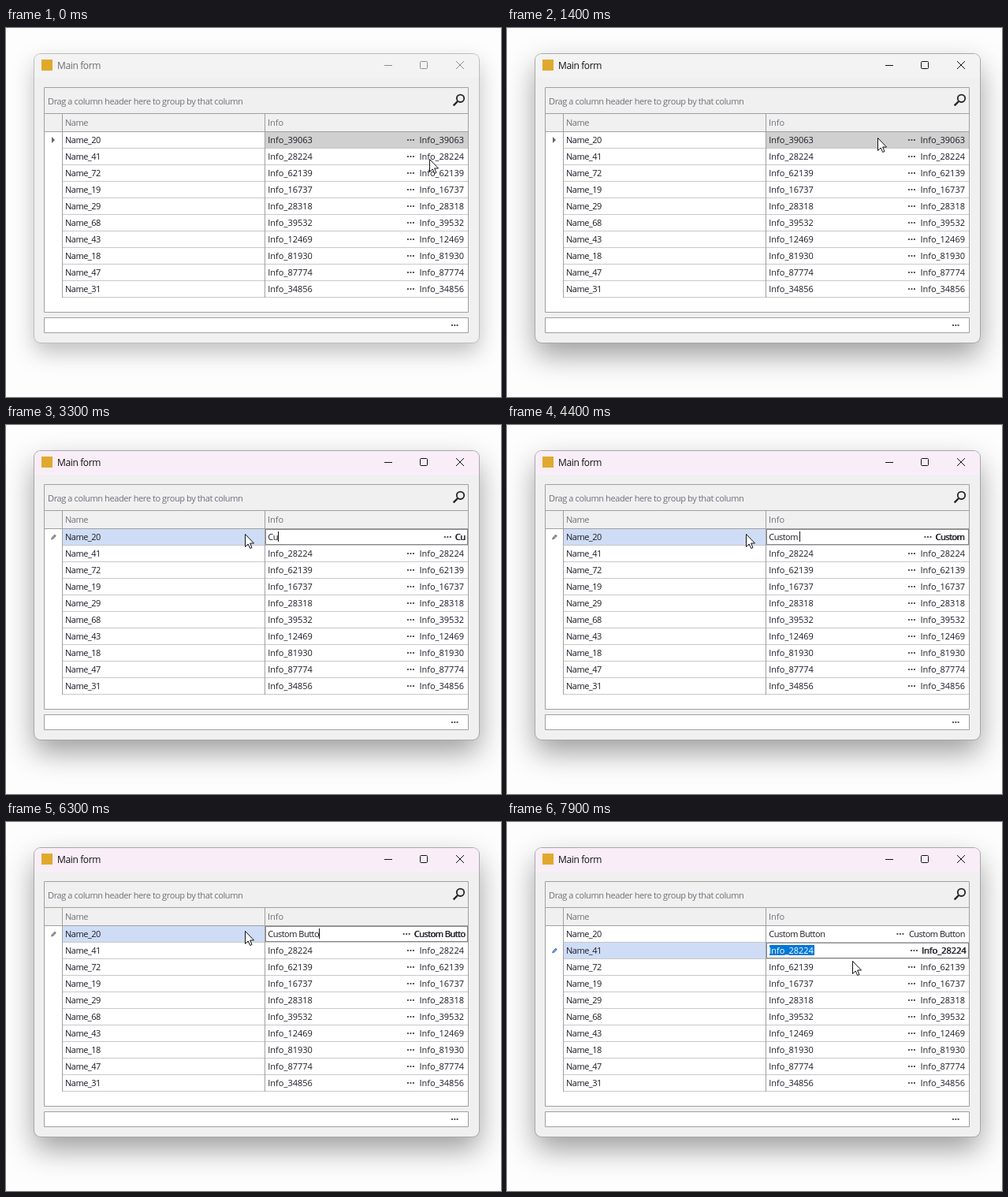
Recreate the animation shown at these times as an HTML page. Size 628 by 468 pixels, loop 8 s.

```html
<!DOCTYPE html>
<html lang="en">
<head>
<meta charset="utf-8">
<title>Main form</title>
<style>
html, body { margin: 0; width: 100%; height: 100%; overflow: hidden; background: #fdfdfd; }
#stage { position: relative; width: 628px; height: 468px; overflow: hidden; }
#window {
  position: absolute; left: 36px; top: 33px; width: 564px; height: 366px;
  border-radius: 8px; background: #f0f0f0; overflow: visible;
  box-shadow: 0 0 0 1px #bdbdbd, 0 12px 28px rgba(0, 0, 0, .25);
}
#bar { height: 30px; border-radius: 8px 8px 0 0; background: #f3f3f3; }
.active #window { box-shadow: 0 0 0 1px #a8a8a8, 0 16px 36px rgba(0, 0, 0, .38); }
.tinted #bar { background: #f9eef8; }
svg { position: absolute; left: 0; top: 0; }
text { font: 11px "Open Sans", "Noto Sans", sans-serif; letter-spacing: -.5px; fill: #1c1c26; }
text.info { letter-spacing: 0; }
text.head { fill: #70707a; }
#caption text { font-size: 12px; letter-spacing: -.37px; fill: #6c6c6c; }
#caption path { fill: none; stroke: #8c8c8c; }
.active #caption text { fill: #111; }
.active #caption path { stroke: #111; }
.line { fill: none; stroke: #a0a0a0; }
.rule { stroke: #c8c8c8; }
</style>
</head>
<body>
<div id="stage">
  <div id="window"><div id="bar"></div></div>
  <svg width="628" height="468" viewBox="0 0 628 468">
    <rect x="45" y="40" width="14" height="14" fill="#e0a92e"/>
    <g id="caption">
      <text x="65" y="52">Main form</text>
      <path d="M480 47.5h10M571 42l10 10m0-10l-10 10"/>
      <path d="M526.5 42.5h7a1 1 0 0 1 1 1v7a1 1 0 0 1-1 1h-7a1 1 0 0 1-1-1v-7a1 1 0 0 1 1-1z"/>
    </g>
    <path d="M49 132H586V360H49zM49 368H586V386H49z" fill="#fff"/>
    <text class="head" x="53" y="97" style="letter-spacing:-.39px">Drag a column header here to group by that column</text>
    <text class="head" x="75" y="124">Name</text>
    <text class="head" x="332" y="124" style="letter-spacing:0">Info</text>
    <g fill="none" stroke="#24242c">
      <circle cx="576.5" cy="89.3" r="4.7" stroke-width="1.8"/>
      <path d="M573 93l-5.3 5.3" stroke-width="2.4"/>
    </g>
    <g id="rows"></g>
    <path class="line" d="M48.5 75.5H586.5V360.5H48.5zM48.5 108.5H586M48.5 131.5H586M71.5 108V342M328.5 108V342M48.5 367.5H586.5V386.5H48.5z"/>
    <g id="edit"></g>
    <path d="M565 376h2v2h-2zm3.3 0h2v2h-2zm3.3 0h2v2h-2z" fill="#555"/>
    <path id="arrow" d="M.5 .5V16.5L4.2 13L6.7 18.5L9 17.5L6.6 12H11.5z" fill="#fff" stroke="#111"/>
    <path id="beam" d="M-3 .5H-1Q0 .5 0 2V14Q0 15.5 -1 15.5H-3M3 .5H1Q0 .5 0 2M0 14Q0 15.5 1 15.5H3" fill="none" stroke="#111"/>
  </svg>
</div>
<script>
const LOOP = 8000, STEP = 100, TOP = 132, PITCH = 21;
const names = [20, 41, 72, 19, 29, 68, 43, 18, 47, 31].map(n => "Name_" + n);
const infos = [39063, 28224, 62139, 16737, 28318, 39532, 12469, 81930, 87774, 34856].map(n => "Info_" + n);

const phrase = "Custom Button";
const keyTimes = [3200, 3300, 3500, 3700, 3800, 4100, 4400, 4800, 5800, 6000, 6200, 6300, 6600];

// time, x, y, shape; "hold" points jump, others glide to the next one
const path = [
  [0, 537, 166, "arrow"], [800, 547, 143, "arrow"], [900, 547, 143, "arrow"],
  [1200, 502, 140, "arrow"], [1400, 470, 139, "arrow", "hold"],
  [1500, 466, 132, "beam"], [1800, 421, 132, "beam", "hold"],
  [2000, 359, 132, "beam", "hold"], [2100, 306, 132, "beam", "hold"],
  [2300, 303, 138, "arrow", "hold"], [7800, 385, 160, "arrow", "hold"],
  [7900, 438, 176, "arrow", "hold"]
];

const $ = id => document.getElementById(id);
const pen = document.createElement("canvas").getContext("2d");
const isInfo = s => s.startsWith("Info");

function widthOf(s) {
  pen.font = '11px "Open Sans", "Noto Sans", sans-serif';
  return pen.measureText(s).width - (isInfo(s) ? 0 : .5 * s.length);
}

const rect = (x, y, w, h, fill, more = "") =>
  `<rect x="${x}" y="${y}" width="${w}" height="${h}" fill="${fill}" ${more}/>`;
const label = (x, y, s, fill) =>
  `<text x="${x}" y="${y}" class="${isInfo(s) ? "info" : ""}"${fill ? ` style="fill:${fill}"` : ""}>${s}</text>`;
const dots = (x, y) => [0, 3.5, 7].map(d => rect(x + d, y, 2, 2, "#555")).join("");

function cursorAt(t) {
  let i = path.length - 1;
  while (path[i][0] > t) i--;
  const [t0, x, y, shape, hold] = path[i], next = path[i + 1];
  const k = hold || !next ? 0 : (t - t0) / (next[0] - t0);
  return { shape, x: k ? x + (next[1] - x) * k : x, y: k ? y + (next[2] - y) * k : y };
}

function stateAt(t) {
  const typed = keyTimes.filter(k => k <= t).length;
  const editing = t >= 1500 && t < 7100 || t >= 7900;
  return {
    typed, editing,
    cursor: cursorAt(t),
    row: t < 7200 ? 0 : 1,
    focused: t >= 1500,
    text: typed ? phrase.slice(0, typed) : infos[0],
    selected: editing && (!typed || t >= 7900),
    caret: t >= 2800 && t < 7100 && !(t >= 5400 && t < 5800)
  };
}

function drawRow(i, s) {
  const y = TOP + PITCH * i, base = y + 14, here = i === s.row;
  const text = i ? infos[i] : s.text;
  const edit = here && s.editing, w = widthOf(text);
  const right = edit ? 583 : 581, start = right - w;
  const hover = here && !s.focused && s.cursor.y < 152 && s.cursor.x > 521;
  let out = `<path class="rule" d="M72 ${y + 20.5}H586"/>`;
  if (here && s.focused) out += rect(72, y, 256, 20, "#cfdcf6");
  if (here && !s.focused) out += rect(329, y, 257, 20, "#d0d0d0");
  if (hover) out += rect(521.5, y + .5, 63, 19, "#dce9f8", 'stroke="#8096b8"');
  out += label(75, base, names[i]);
  if (edit && s.selected) out += rect(333, y + 3, 57, 13, "#0078d7");
  out += label(332.3, base, text, edit && s.selected ? "#fff" : "");
  out += dots(start - (edit ? 14.5 : 15.5), y + 9) + label(start, base, text);
  if (edit) out += label(start - .7, base, text);
  return out;
}

function drawFocus(s) {
  const y = TOP + PITCH * s.row;
  let out = "";
  if (s.focused)
    out += rect(329.5, y + .5, 256, 19, "none", 'stroke="#111" stroke-dasharray="1 1"');
  if (s.editing)
    out += `<path d="M57 ${y + 13.5}l.8-2.8 4-4 2 2-4 4z" fill="${s.typed && !s.row ? "#777" : "#4a74b8"}"/>`
      + `<path d="M58.8 ${y + 11.7}l3-3" stroke="#dde4f0" stroke-width=".7"/>`;
  else
    out += `<path d="M58 ${y + 6}l4 4-4 4z" fill="#666"/>`;
  if (s.caret) {
    const x = s.typed ? Math.round(332.3 + widthOf(s.text)) : 333;
    out += rect(x, y + 3, 1, 13, "#111");
  }
  return out;
}

function draw(t) {
  const s = stateAt(t), c = s.cursor;
  $("stage").className = (t >= 1300 ? "active " : "") + (t >= 1500 ? "tinted" : "");
  $("rows").innerHTML = names.map((_, i) => drawRow(i, s)).join("");
  $("edit").innerHTML = drawFocus(s);
  for (const shape of ["arrow", "beam"]) {
    $(shape).style.display = shape === c.shape ? "" : "none";
    $(shape).setAttribute("transform", `translate(${Math.round(c.x) + (shape === "beam" ? .5 : 0)} ${Math.round(c.y)})`);
  }
}

let shown = -1;
function tick() {
  const t = Math.floor(performance.now() % LOOP / STEP) * STEP;
  if (t !== shown) draw(shown = t);
  requestAnimationFrame(tick);
}
tick();
</script>
</body>
</html>
```
